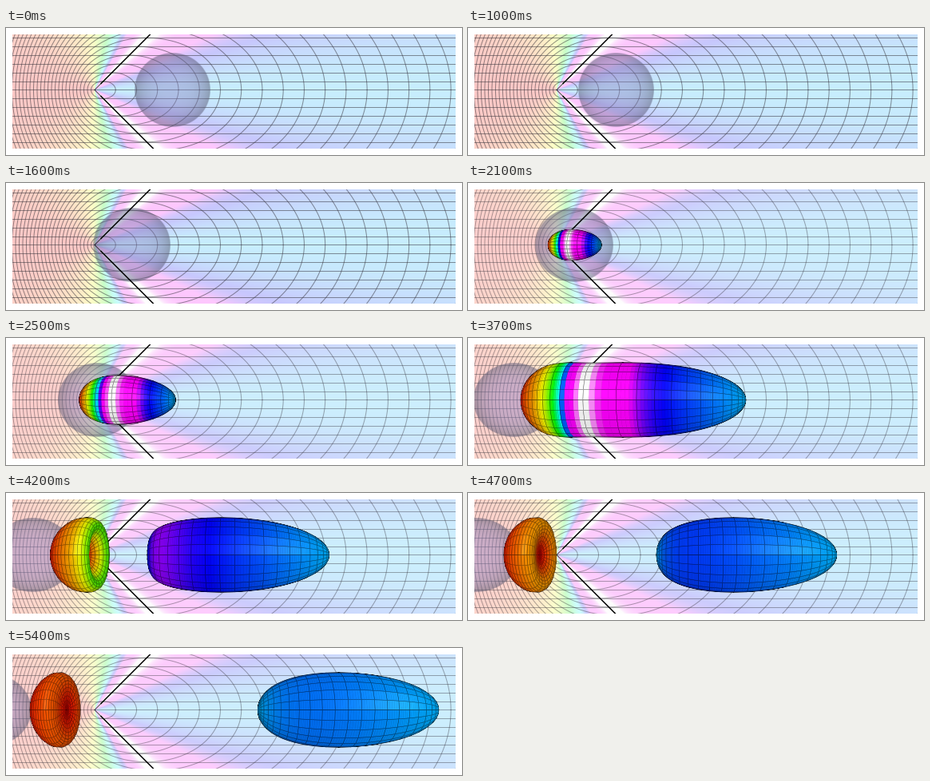
Recreate the animation shown at these times as a matplotlib script. Size 571 px wide and 159 px high, loop 6000 ms.

```python
import numpy as np
import matplotlib.pyplot as plt
from matplotlib.animation import FuncAnimation
from matplotlib.collections import PolyCollection
from matplotlib.colors import hsv_to_rgb

W, H, DPI = 571, 159, 100
PX = 72 / DPI                        # one pixel in points
LEFT, RIGHT, TOP, BOTTOM = 8, 563, 8, 151

BETA = np.sqrt(2)                    # speed of the ball in units of c
OX, OY = 111, 77.5                   # observer
R = 46.3                             # ball radius
START, STEP = 209.2, 4.68            # ball path along x
CAM_X, CAM_D = 286, 500              # camera for the solid bodies
ROWS, COLS, SUB = 24, 24, 5          # surface mesh
CELL = 10.87                         # rest grid spacing
LAST = 49                            # number of moves

# Doppler factor -> hue in degrees
FACTOR = [.41, .45, .5, .6, .75, 1, 1.42, 1.9, 2.41, 2.5, 2.6, 2.8, 3, 3.2, 3.4, 3.6]
HUE = [2, 9, 18, 31, 44, 68, 115, 165, 197, 210, 221, 236, 249, 267, 287, 300]


def doppler_hsv(x, rho, value):
    r = np.hypot(x, rho) + 1e-9
    d = 1 / (np.abs(1 - BETA * x / r) + 1e-6)
    hue = np.interp(d, FACTOR, HUE) / 360
    sat = np.interp(d, [5.5, 15], [1, 0])
    return np.stack([hue, sat, np.broadcast_to(value, hue.shape)], axis=-1)


def refine(edges, ease_last):
    """Subdivide each cell; the last one gets denser towards a fold."""
    u = np.linspace(0, 1, SUB + 1)
    parts = []
    for k, (a, b) in enumerate(zip(edges[:-1], edges[1:])):
        v = 1 - (1 - u) ** 2 if ease_last and k == len(edges) - 2 else u
        parts.append(a + (b - a) * v[:-1])
    return np.append(np.concatenate(parts), edges[-1])


def profile(phi, sign, c):
    """Apparent outline (x, rho) of the ball seen with light delay."""
    s, rho = c - R * np.cos(phi), R * np.sin(phi)
    return -s + sign * np.sqrt(np.maximum(2 * s**2 - 2 * rho**2, 0)), rho


def profiles(c):
    q = -c / (BETA * R)
    phi = np.linspace(0, np.pi, ROWS + 1)
    if q >= 1:
        f = refine(phi, False)
        return [profile(f[::-1], -1, c), profile(f, 1, c)]
    end = np.pi / 4 + np.arcsin(max(q, -1))
    if end < .03:
        return []
    f = refine(np.append(phi[phi < end - .01], end), True)
    sign = np.r_[np.ones(len(f)), -np.ones(len(f) - 1)]
    return [profile(np.r_[f, f[-2::-1]], sign, c)]


def project(p):
    k = CAM_D / (CAM_D - p[..., 2])
    return np.stack([CAM_X + (p[..., 0] - CAM_X) * k,
                     OY + (p[..., 1] - OY) * k], axis=-1)


def area(poly):
    x, y = poly[..., 0], poly[..., 1]
    return (x * np.roll(y, -1, -1) - np.roll(x, -1, -1) * y).sum(-1) / 2


LIGHT = np.array([.2, -.2, .96])
LIGHT /= np.linalg.norm(LIGHT)
theta = np.linspace(0, 2 * np.pi, COLS + 1)


def body(x, rho):
    """Visible polygons of a surface of revolution, sorted far to near."""
    p = np.stack([np.repeat(OX + x[:, None], COLS + 1, 1),
                  OY + rho[:, None] * np.cos(theta),
                  rho[:, None] * np.sin(theta)], axis=-1)
    quads = np.stack([p[:-1, :-1], p[1:, :-1], p[1:, 1:], p[:-1, 1:]], axis=2)
    mid = quads.mean(2)
    n = np.cross(quads[:, :, 2] - quads[:, :, 0], quads[:, :, 3] - quads[:, :, 1])
    n /= np.linalg.norm(n, axis=-1, keepdims=True) + 1e-9
    lit = np.maximum(n @ LIGHT, 0)
    hsv = doppler_hsv(mid[..., 0] - OX, np.hypot(mid[..., 1] - OY, mid[..., 2]),
                      .78 + .18 * lit)
    rgb = np.minimum(hsv_to_rgb(hsv) + .14 * lit[..., None] ** 40, 1)

    cells = (len(x) - 1) // SUB
    i = np.arange(cells)[:, None] * SUB + np.arange(SUB + 1)
    rings = p[i]
    loops = np.concatenate([rings[:, :, :-1], rings[:, ::-1, 1:]], axis=1)
    loops = loops.transpose(0, 2, 1, 3)
    far = np.linalg.norm(loops.mean(2) - [CAM_X, OY, CAM_D], axis=-1)

    quads, loops = project(quads), project(loops)
    see, see_loop = area(quads) > 0, area(loops) > 0
    faces, cols = quads[see], rgb[see]
    nets, net_far = loops[see_loop], far[see_loop]
    face_far = np.repeat(far, SUB, 0)[see]

    polys = list(nets) + list(faces) + list(nets)
    black, clear = [0, 0, 0, 1], [0, 0, 0, 0]
    m = len(nets)
    opaque = np.c_[cols, np.ones(len(cols))]
    fill = np.r_[np.tile(black, (m, 1)), opaque, np.tile(clear, (m, 1))]
    edge = np.r_[np.tile(black, (m, 1)), opaque, np.tile([0, 0, 0, .5], (m, 1))]
    width = np.r_[np.full(m, 1.5), np.full(len(cols), .5), np.full(m, .55)] * PX
    key = np.r_[net_far + 1e5, face_far, net_far - .01]
    order = np.argsort(-key, kind="stable")
    return [polys[k] for k in order], fill[order], edge[order], width[order]


fig = plt.figure(figsize=(W / DPI, H / DPI), dpi=DPI, facecolor="white")
ax = fig.add_axes([LEFT / W, 1 - BOTTOM / H, (RIGHT - LEFT) / W, (BOTTOM - TOP) / H])
ax.axis("off")

# Doppler colours of the plane
gx, gy = np.meshgrid(np.arange(LEFT, RIGHT) + .5, np.arange(TOP, BOTTOM) + .5)
plane = ax.imshow(hsv_to_rgb(doppler_hsv(gx - OX, np.abs(gy - OY), .97)),
                  extent=(LEFT, RIGHT, BOTTOM, TOP), aspect="auto", zorder=0)

# Rest grid as the observer sees it
grid = []
a = np.linspace(0, 2 * np.pi, 200)
for k in range(1, 28):
    s = k * CELL
    grid += ax.plot(OX + s + BETA * s * np.cos(a), OY + s * np.sin(a))
for k in range(-6, 7):
    grid += ax.plot([LEFT, RIGHT], [OY + k * CELL] * 2)
plt.setp(grid, color=(.22, .21, .24), lw=PX, zorder=1)

# Grey ball at its true place
u, v = np.meshgrid(np.linspace(-1, 1, 192), np.linspace(-1, 1, 192))
rr = np.hypot(u, v)
t = np.clip(rr, 0, 1)[..., None] ** 3
tint = (1 - t) * np.array([138, 130, 195]) / 255 + t * np.array([85, 85, 112]) / 255
cover = (.42 + .1 * t[..., 0]) * np.clip((1 - rr) * 48 + .5, 0, 1)
ball = ax.imshow(np.dstack([tint, cover]), aspect="auto", zorder=2)

# Shock wave, fine at its tip
for near, far, lw in [(0, 8, .7), (8, 80, 1.5)]:
    for side in (-1, 1):
        ax.plot([OX + near, OX + far], [OY + side * near, OY + side * far],
                color="black", lw=lw * PX, zorder=3)

skin = PolyCollection([], zorder=4)
ax.add_collection(skin, autolim=False)
ax.set_xlim(LEFT, RIGHT)
ax.set_ylim(BOTTOM, TOP)


def draw(n):
    i = min(max(n - 5, 0), LAST)
    x = START - STEP * i
    c = x - OX

    pale = i > 11
    plane.set_alpha(.2 if pale else .22)
    plt.setp(grid, alpha=.42 if pale else .54)
    ball.set_alpha(np.clip(cover * (.9 if pale else 1), 0, 1))

    tilt = np.arctan((x - CAM_X) / CAM_D)
    half = np.arcsin(R / np.hypot(x - CAM_X, CAM_D))
    x0, x1 = CAM_X + CAM_D * np.tan([tilt - half, tilt + half])
    ball.set_extent((x0, x1, OY + R, OY - R))
    ax.set_xlim(LEFT, RIGHT)
    ax.set_ylim(BOTTOM, TOP)

    polys, fill, edge, width = [], [], [], []
    for x_app, rho in profiles(c):
        b = body(x_app, rho)
        polys += b[0]
        fill += list(b[1])
        edge += list(b[2])
        width += list(b[3])
    skin.set_visible(bool(polys))
    if polys:
        skin.set_verts(polys)
        skin.set_facecolor(fill)
        skin.set_edgecolor(edge)
        skin.set_linewidth(width)
    return [plane, ball, skin]


anim = FuncAnimation(fig, draw, frames=60, interval=100, repeat=True,
                     repeat_delay=0, blit=False)
plt.show()
```
